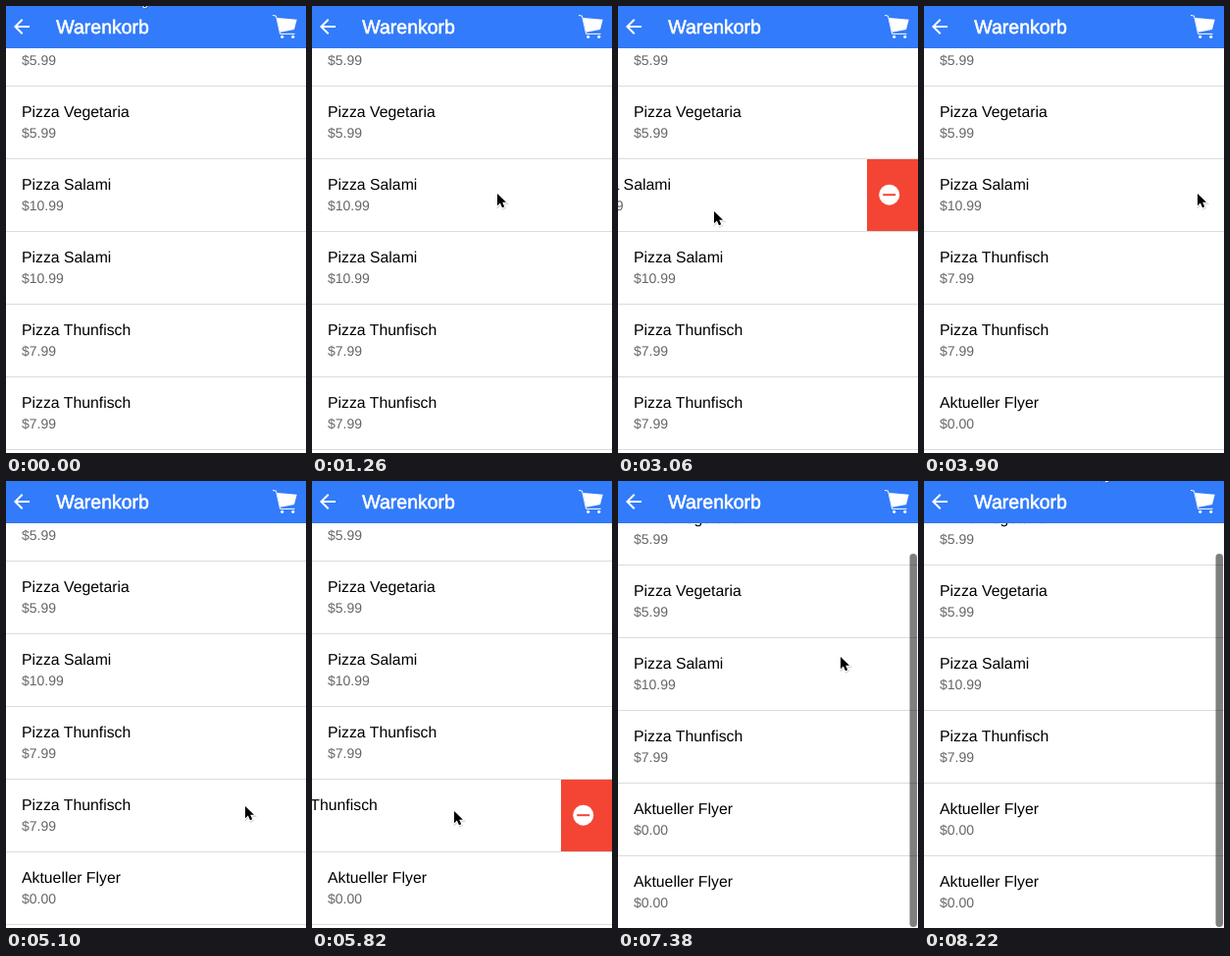
An HTML page for the animation above (8.52 s loop, 306 by 455 pixels).

```html
<!DOCTYPE html>
<html lang="de">
<head>
<meta charset="utf-8">
<title>Warenkorb</title>
<style>
  html, body { margin: 0; width: 100%; height: 100%; overflow: hidden; background: #fff; }
  svg { display: block; width: 100%; height: 100%; font-family: "Liberation Sans", Arial, sans-serif;
        text-rendering: geometricPrecision; }
  .name { font-size: 15.8px; fill: #000; }
  .price { font-size: 14px; fill: #666; }
  .title { font-size: 19.5px; fill: #fff; stroke: #fff; stroke-width: .6px; }
</style>
</head>
<body>
<svg viewBox="0 0 306 455">
  <rect width="306" height="455" fill="#fff"/>
  <g id="list"></g>
  <rect id="scrollbar" x="297.5" y="74" width="7.5" height="380" rx="3.75" fill="#000" fill-opacity=".5"/>

  <rect width="306" height="43" fill="#327bfb"/>
  <rect y="42" width="306" height="1" fill="#2f76f0"/>
  <path transform="translate(4 9)" fill="#fff"
        d="M20 11H7.83l5.59-5.59L12 4l-8 8 8 8 1.41-1.41L7.83 13H20z"/>
  <text class="title" x="51.3" y="28">Warenkorb</text>
  <g fill="#fff">
    <path d="M276.3 12L296.7 13.8 294 24 279.6 26.8z"/>
    <path d="M272 9.5L275.5 10.1 279.6 28.4H294.5" fill="none" stroke="#fff"/>
    <circle cx="281.7" cy="31.3" r="1.6"/>
    <circle cx="292.7" cy="31.3" r="1.6"/>
  </g>

  <g id="cursor">
    <path d="M1 1V13.2L3.9 10.5 6 15.3 8.2 14.3 6.2 9.7H10z" transform="translate(.6 1.2)"
          stroke="#000" stroke-width="2" opacity=".15"/>
    <path d="M1 1V13.2L3.9 10.5 6 15.3 8.2 14.3 6.2 9.7H10z"
          stroke="#fff" stroke-width="2" stroke-linejoin="round" paint-order="stroke"/>
  </g>
</svg>
<script>
const LOOP = 8520, TICK = 60;
const WIDTH = 306, HEIGHT = 455, ROW = 74, LIST_TOP = 8;
const BUTTON = 52, DRAG_THRESHOLD = 23, DAMPING = .35, SETTLE = 200;

const menu = {
  'Pizza Vegetaria': '$5.99', 'Pizza Salami': '$10.99',
  'Pizza Thunfisch': '$7.99', 'Aktueller Flyer': '$0.00'
};
// Every product is in the cart twice.
const items = Object.entries(menu).flatMap(([name, price]) => [{ name, price }, { name, price }]);

const clamp = u => Math.min(1, Math.max(0, u));
const ease = u => u * u * (3 - 2 * u);
const byId = id => document.getElementById(id);
const moveTo = (el, x, y) => el.setAttribute('transform', `translate(${x} ${y})`);
const show = (el, visible) => el.setAttribute('visibility', visible ? 'inherit' : 'hidden');

// The cursor's story: each glide waits, then eases on from where the last one ended.
const glides = [];
let now = 0, here = [135, -14];

function glide(duration, x, y, pause = 180) {
  const start = now + pause;
  glides.push({ start, duration, from: here, to: [x, y] });
  here = [x, y];
  now = start + duration;
  return start;
}

function swipeAway(item, duration, x, y) {
  const row = items.slice(0, items.indexOf(item)).filter(i => !i.removedAt).length;
  item.grabX = here[0];
  item.grab = glide(duration, x, y);
  item.release = now;
  glide(720, 278, LIST_TOP + (row + .5) * ROW - 3, 0);
  item.removedAt = now += 2 * TICK;
}

glide(240, 175, 132, 240);
glide(420, 197, 189);
glide(300, 112, 194, 120);
glide(360, 176, 196, 0);
swipeAway(items[2], 1020, 97, 208);
glide(360, 243, 288, 480);
glide(180, 243, 330);
swipeAway(items[5], 540, 144, 335);
const leaving = glide(360, 174, 18, 540);
glide(480, 180, -15);

function cursorAt(t) {
  const g = glides.findLast(g => g.start <= t) || glides[0];
  const u = ease(clamp((t - g.start) / g.duration));
  return g.from.map((v, i) => v + (g.to[i] - v) * u);
}

// The row follows the drag, resists beyond the button's width and springs back on release.
function rowOffset(item, t) {
  if (t < item.grab) return 0;
  const [x] = cursorAt(Math.min(t, item.release));
  const pull = Math.max(0, item.grabX - x - DRAG_THRESHOLD);
  const excess = Math.max(0, pull - BUTTON) * DAMPING;
  return -Math.min(pull, BUTTON) - excess * (1 - ease(clamp((t - item.release) / SETTLE)));
}

byId('list').innerHTML = items.map(({ name, price, grab }) => `
  <g>
    ${grab ? `<rect x="${WIDTH - BUTTON}" width="${BUTTON}" height="73" fill="#f44534"/>
    <circle cx="276.7" cy="36.2" r="10.5" fill="#fff"/>
    <rect x="270.2" y="35.2" width="13" height="2" fill="#f44534"/>` : ''}
    <g>
      <rect width="${WIDTH}" height="73" fill="#fff"/>
      <text class="name" x="16" y="31">${name}</text>
      <text class="price" x="16" y="52">${price}</text>
    </g>
    <rect y="73" width="${WIDTH}" height="1" fill="#dcdcdc"/>
  </g>`).join('');
const rows = [...byId('list').children];

function draw(t) {
  const inCart = item => !(t >= item.removedAt);
  // A short list stays aligned with the bottom edge.
  let y = Math.max(LIST_TOP, HEIGHT + 1 - items.filter(inCart).length * ROW);
  items.forEach((item, i) => {
    show(rows[i], inCart(item));
    if (!inCart(item)) return;
    moveTo(rows[i], 0, y);
    if (item.grab) moveTo(rows[i].querySelector('g'), rowOffset(item, t), 0);
    y += ROW;
  });
  show(byId('scrollbar'), t > leaving);
  moveTo(byId('cursor'), ...cursorAt(t).map(Math.round));
}

const start = performance.now();
function frame() {
  const t = (performance.now() - start) % LOOP;
  draw(Math.floor(t / TICK) * TICK);
  requestAnimationFrame(frame);
}
frame();
</script>
</body>
</html>
```
